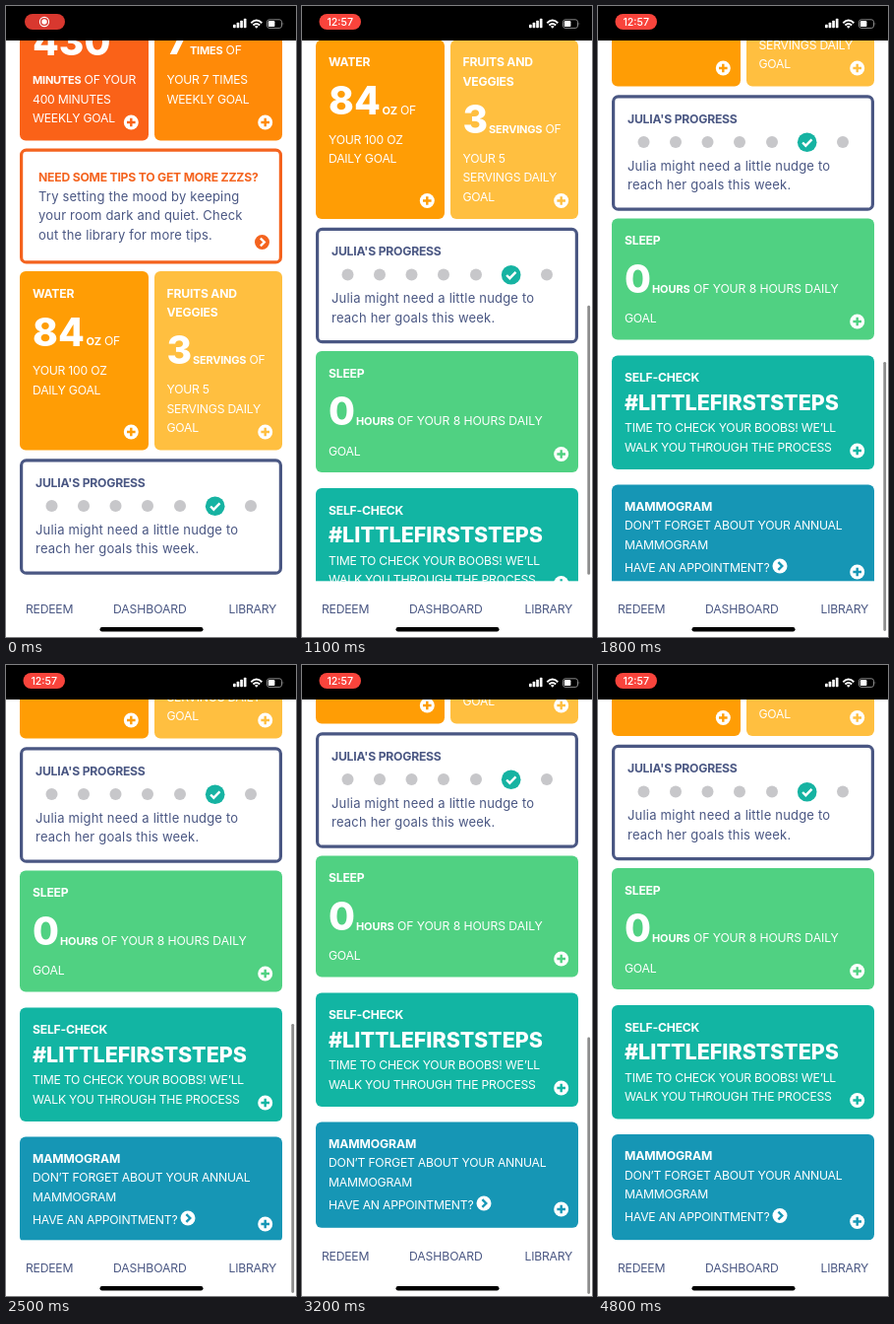
An HTML page for the animation above (4.9 s loop, 295 by 640 pixels).

```html
<!DOCTYPE html>
<html lang="en">
<head>
<meta charset="utf-8">
<title>Wellness dashboard</title>
<style>
  html, body { margin: 0; width: 100%; height: 100%; overflow: hidden; background: #fff; }
  svg { display: block; width: 295px; height: 640px; }
  text { font: 400 12.2px Inter, "Open Sans", sans-serif; letter-spacing: -.23px; fill: #fff; white-space: pre; }
  .bold { font-weight: 700; }
  .unit { font-weight: 700; font-size: 11px; }
  .num { font-weight: 800; font-size: 39px; letter-spacing: 0; }
  .tag { font-weight: 800; font-size: 21.5px; letter-spacing: 0; }
  .wide { letter-spacing: -.1px; }
  .navy { fill: #4a5783; }
  .orange { fill: #f4631e; }
  .body { font-size: 13px; letter-spacing: .2px; fill: #4a5783; }
  .clock { font-weight: 500; font-size: 10.6px; letter-spacing: 0; text-anchor: middle; }
</style>
</head>
<body>
<svg id="stage" viewBox="0 0 295 640"></svg>
<script>
const LOOP = 4900, STEP = 100, MAX_SCROLL = 378.5;

const text = (x, y, s, cls = '') => `<text x="${x}" y="${y}" class="${cls}">${s}</text>`;
const lines = (x, y, rows, cls) => rows.map((s, i) => text(x, y + i * 19.6, s, cls)).join('');
const unit = s => `<tspan class="unit">${s}</tspan>`;
const card = (x, y, w, h, fill) => `<rect x="${x}" y="${y}" width="${w}" height="${h}" rx="6" fill="${fill}"/>`;
const frame = (y, h, color) =>
  `<rect x="15.6" y="${y + 1.6}" width="263.8" height="${h - 3.2}" rx="5" fill="#fff" stroke="${color}" stroke-width="3.2"/>`;
const icon = (x, y, r, fill, mark, path) =>
  `<g transform="translate(${x} ${y})"><circle r="${r}" fill="${fill}"/>
   <path d="${path}" fill="none" stroke="${mark}" stroke-width="2.4"/></g>`;
const plus = (x, y, color) => icon(x, y, 7.5, '#fff', color, 'M-4.3 0H4.3M0-4.3V4.3');
const chevron = (x, y, fill, mark) => icon(x, y, 7.5, fill, mark, 'M-1.6-3.9L2.3 0L-1.6 3.9');

const RED = '#fa6218', ORANGE = '#ff8a08', AMBER = '#ff9d05', YELLOW = '#ffbf40',
      NAVY = '#4a5783', GREEN = '#50d182', TEAL = '#12b5a3', BLUE = '#1696b5';

const activity =
  card(14, -60, 131, 196.5, RED) + text(27, 50, '430', 'num') +
  lines(27, 79, [unit('MINUTES') + ' OF YOUR', '400 MINUTES', 'WEEKLY GOAL']) + plus(127.3, 118, RED) +
  card(151, -60, 130, 196.5, ORANGE) + text(163.5, 48.5, '7', 'num') +
  text(187, 49, unit('TIMES') + ' OF') +
  lines(163.5, 79, ['YOUR 7 TIMES', 'WEEKLY GOAL']) + plus(263.7, 118, ORANGE);

const tips =
  frame(144.5, 117, '#f4631e') +
  text(33, 178, 'NEED SOME TIPS TO GET MORE ZZZS?', 'bold orange') +
  lines(33, 197.5, ['Try setting the mood by keeping', 'your room dark and quiet. Check',
    'out the library for more tips.'], 'body') +
  chevron(260.5, 239.5, '#f4631e', '#fff');

const food =
  card(14, 269, 131, 181.5, AMBER) + text(27, 295.5, 'WATER', 'bold') + text(27, 344.5, '84', 'num') +
  text(81.5, 344, unit('OZ') + ' OF') +
  lines(27, 374.2, ['YOUR 100 OZ', 'DAILY GOAL']) + plus(127.3, 432, AMBER) +
  card(151, 269, 130, 181.5, YELLOW) + lines(163.5, 295.5, ['FRUITS AND', 'VEGGIES'], 'bold') +
  text(163.5, 363, '3', 'num') + text(190, 363.2, unit('SERVINGS') + ' OF') +
  lines(163.5, 393, ['YOUR 5', 'SERVINGS DAILY', 'GOAL']) + plus(263.7, 432, YELLOW);

const progress =
  frame(459.2, 117.6, NAVY) + text(30, 487.6, "JULIA'S PROGRESS", 'bold navy') +
  [46.5, 79, 111.5, 144, 177, 249].map(x => `<circle cx="${x}" cy="507.1" r="6" fill="#c7c7ca"/>`).join('') +
  icon(212.7, 507.2, 9.8, '#16b3a2', '#fff', 'M-4.6 .3L-1.4 3.5L4.8-2.9') +
  lines(30, 535.8, ['Julia might need a little nudge to', 'reach her goals this week.'], 'body');

const sleep =
  card(14, 584.5, 267, 123, GREEN) + text(27, 611, 'SLEEP', 'bold') + text(27, 659.5, '0', 'num') +
  text(55, 659.5, unit('HOURS') + ' OF YOUR 8 HOURS DAILY', 'wide') +
  text(27, 690, 'GOAL') + plus(263.7, 689, GREEN);

const selfCheck =
  card(14, 723.5, 267, 115.5, TEAL) + text(27, 750, 'SELF-CHECK', 'bold') +
  text(27, 778.7, '#LITTLEFIRSTSTEPS', 'tag') +
  lines(27, 801, ['TIME TO CHECK YOUR BOOBS! WE’LL', 'WALK YOU THROUGH THE PROCESS']) + plus(263.7, 820, TEAL);

const mammogram =
  card(14, 854.5, 267, 107.5, BLUE) + text(27, 880.5, 'MAMMOGRAM', 'bold wide') +
  lines(27, 900, ['DON’T FORGET ABOUT YOUR ANNUAL', 'MAMMOGRAM']) +
  text(27, 942.5, 'HAVE AN APPOINTMENT?') + chevron(185, 937, '#fff', BLUE) + plus(263.7, 943, BLUE);

const nav = '<rect y="583.3" width="295" height="120" fill="#fff"/>' +
  text(20, 616.3, 'REDEEM', 'navy') + text(109, 616.3, 'DASHBOARD', 'navy wide') + text(226.5, 616.3, 'LIBRARY', 'navy');

const status = `<rect width="295" height="35" fill="#000"/>
  <rect id="pill" y="8" height="16" rx="8"/>
  <g id="rec"><circle cx="39" cy="16" r="4.6" fill="none" stroke="#fff" stroke-width="1.1"/>
    <circle cx="39" cy="16" r="2.7" fill="#fff"/></g>
  <g id="clock">${text(38.7, 19.8, '12:57', 'clock')}</g>
  ${[0, 1, 2, 3].map(i =>
    `<rect x="${231 + i * 3.6}" y="${18.7 - i * 2}" width="2.7" height="${3.6 + i * 2}" rx=".7" fill="#fff"/>`).join('')}
  <g fill="none" stroke="#fff" stroke-width="1.9">
    <path d="M249.3 17.2Q254.8 11.9 260.3 17.2M251.4 19.5Q254.8 16.4 258.2 19.5"/></g>
  <path d="M252.9 20.8Q254.8 19.4 256.7 20.8L254.8 22.8Z" fill="#fff"/>
  <rect x="265.5" y="13.8" width="15" height="8.6" rx="2.4" fill="none" stroke="#888"/>
  <rect x="266.8" y="15.1" width="6.6" height="6" rx="1.2" fill="#fff"/>
  <path d="M281.7 16.6q1.4 1.5 0 3z" fill="#888"/>`;

const $ = id => document.getElementById(id);
const set = (id, attrs) => { for (const k in attrs) $(id).setAttribute(k, attrs[k]); };

$('stage').innerHTML =
  `<g id="page">${activity + tips + food + progress + sleep + selfCheck + mammogram}</g>
   <g id="nav">${nav}</g>${status}
   <rect x="95.5" y="630" width="105" height="4.4" rx="2.2" fill="#000"/>
   <rect id="bar" x="290.3" width="2.8" rx="1.4" fill="#000"/>`;

// [time, scroll]: flick, slow settle, pull past the end, spring back
const scrollPath = [[600, 0], [700, 18], [800, 72], [900, 136], [1000, 190], [1100, 234.5], [1200, 269],
  [1300, 297], [1400, 320], [1500, 338.5], [1800, 369], [2100, 374.5], [2500, 376], [2700, 390],
  [2900, 400], [3000, 401], [3200, 391], [3400, 381], [3600, MAX_SCROLL]];

function scrollAt(t) {
  const i = scrollPath.findIndex(p => p[0] > t);
  if (i === 0) return 0;
  if (i < 0) return MAX_SCROLL;
  const [t0, a] = scrollPath[i - 1], [t1, b] = scrollPath[i];
  return a + (b - a) * (t - t0) / (t1 - t0);
}

function draw(t) {
  const y = scrollAt(t), over = Math.max(0, y - MAX_SCROLL), timed = t >= 600;
  set('page', { transform: `translate(0 ${-y})` });
  set('nav', { transform: `translate(0 ${-over})` });

  const top = 365 - .425 * (MAX_SCROLL - y + over) + over;
  const fade = Math.min(1, Math.max(0, (4600 - t) / 300));
  set('bar', { y: top, height: Math.min(273, 638 - top), opacity: t < 700 ? 0 : .45 * fade });

  set('pill', timed ? { x: 17.5, width: 42.5, fill: '#f9443c' } : { x: 19, width: 41, fill: '#d8382f' });
  set('rec', { opacity: timed ? 0 : 1 });
  set('clock', { opacity: timed ? 1 : 0 });
}

const start = performance.now();
function tick() {
  const t = (performance.now() - start) % LOOP;
  draw(Math.floor(t / STEP) * STEP);
  requestAnimationFrame(tick);
}
tick();
</script>
</body>
</html>
```
